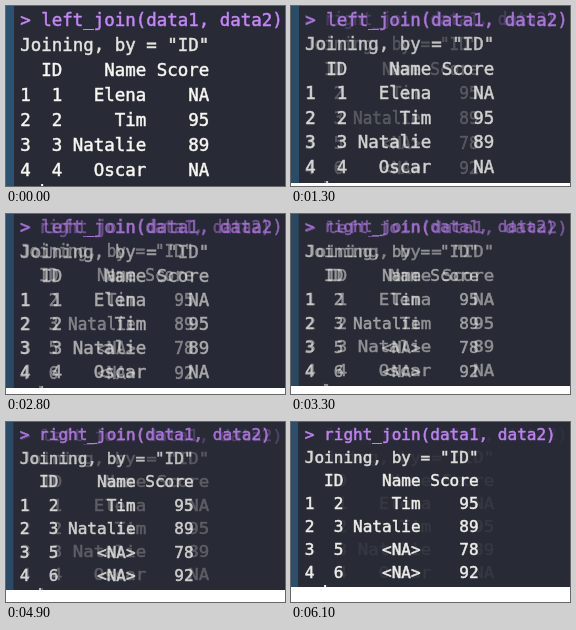
An HTML page with a canvas for the animation above (8 s loop, 279 by 180 pixels).

```html
<!DOCTYPE html>
<html lang="en">
<head>
<meta charset="utf-8">
<title>Left join to right join</title>
<style>
  html, body { margin: 0; width: 100%; height: 100%; overflow: hidden; background: #fff; }
  canvas { display: block; }
</style>
</head>
<body>
<canvas id="stage" width="279" height="180"></canvas>
<script>
const ctx = document.getElementById('stage').getContext('2d');
const LOOP = 8000, FIRST = 500, STEP = 400, LAST = 15;

const row = (n, id, name, score) =>
  n + String(id).padStart(3) + name.padStart(8) + String(score).padStart(6);

const table = (call, rows) => [
  '> ' + call + '(data1, data2)',
  'Joining, by = "ID"',
  row(' ', 'ID', 'Name', 'Score'),
  ...rows.map((r, i) => row(i + 1, ...r)),
];

const left = {
  height: 180, size: 17.45, x: 14.2, baseline: 20.1, leading: 24.95, edge: 8,
  lines: table('left_join', [
    [1, 'Elena', 'NA'], [2, 'Tim', 95], [3, 'Natalie', 89], [4, 'Oscar', 'NA'],
  ]),
};
const right = {
  height: 165, size: 16.05, x: 13.8, baseline: 17.7, leading: 23.1, edge: 7,
  lines: table('right_join', [
    [2, 'Tim', 95], [3, 'Natalie', 89], [5, '<NA>', 78], [6, '<NA>', 92],
  ]),
};

// Paints one console, squeezed to the given height.
function drawConsole(c, height, alpha) {
  ctx.save();
  ctx.globalAlpha = alpha;
  ctx.fillStyle = '#282a36';
  ctx.fillRect(0, 0, 279, height);
  ctx.fillStyle = '#2c5272';
  ctx.fillRect(0, 0, c.edge, height);
  ctx.scale(1, height / c.height);
  ctx.font = c.size + 'px "DejaVu Sans Mono", monospace';
  ctx.lineWidth = 0.5;
  c.lines.forEach((line, i) => {
    const y = c.baseline + i * c.leading;
    ctx.fillStyle = ctx.strokeStyle = ['#c586fb', '#e4e5e0'][i] || '#f8f8f2';
    ctx.fillText(line, c.x, y);
    ctx.strokeText(line, c.x, y);
  });
  // Top of the next prompt line, cut off by the lower edge.
  ctx.fillRect(c.x + c.size * 1.2, c.height - 2, 2, 2);
  ctx.restore();
}

function frame() {
  const t = performance.now() % LOOP;
  const step = Math.max(0, Math.min(LAST, Math.floor((t - FIRST) / STEP) + 1));
  const height = 180 - step;
  ctx.clearRect(0, 0, 279, 180);
  drawConsole(left, height, 1);
  if (step) drawConsole(right, height, step / (LAST + 1));
  requestAnimationFrame(frame);
}
frame();
</script>
</body>
</html>
```
